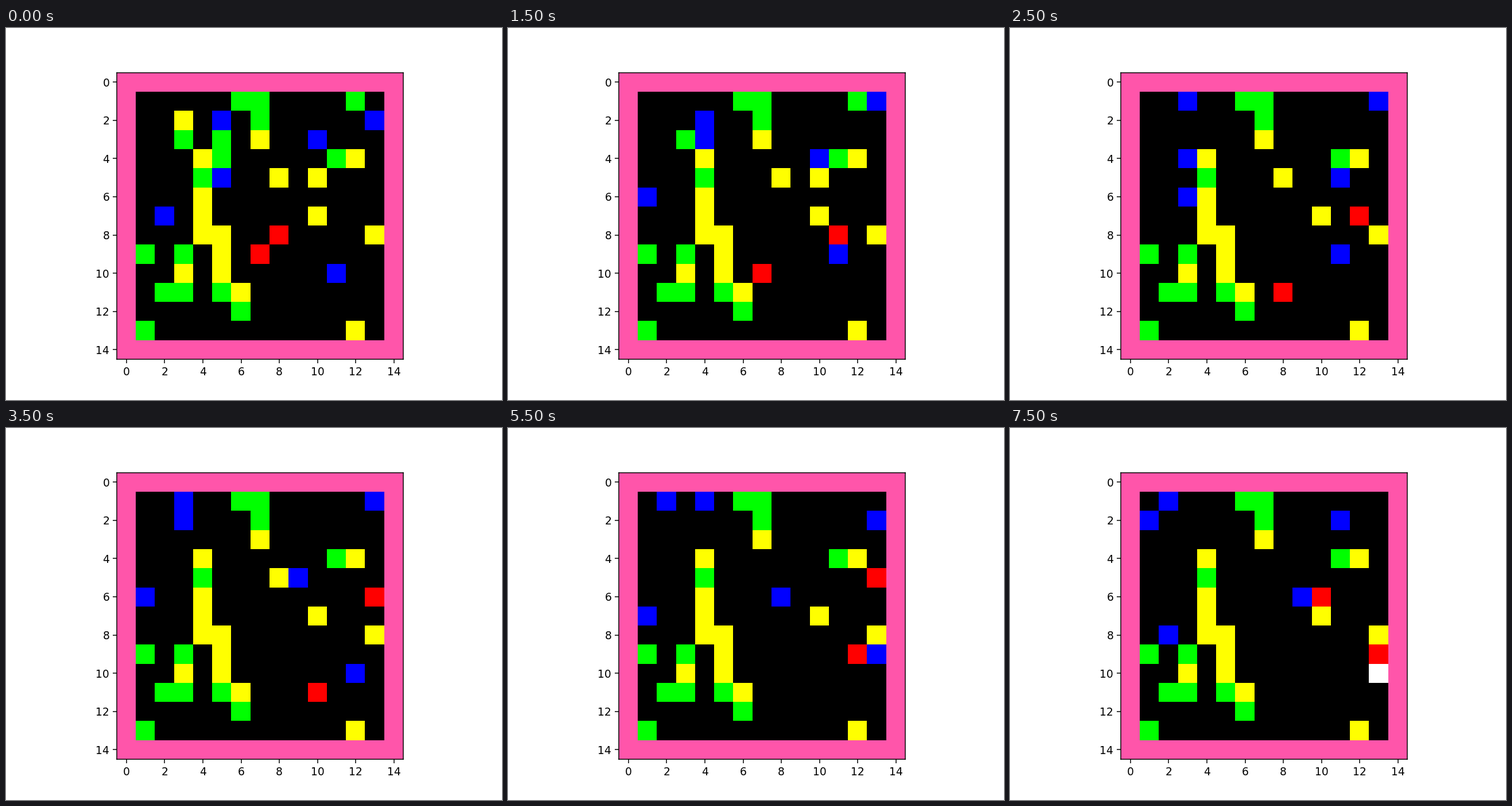
These frames come from a looping animation (864 px wide and 648 px high, 8000 ms). A matplotlib script:

```python
import numpy as np
import matplotlib.pyplot as plt
from matplotlib.animation import FuncAnimation

SIZE, STEPS, INTERVAL = 15, 16, 500

PINK = (255, 85, 170)
GREEN = (0, 255, 0)
YELLOW = (255, 255, 0)
BLUE = (0, 0, 255)
RED = (255, 0, 0)
WHITE = (255, 255, 255)

MOVES = {"U": (-1, 0), "D": (1, 0), "L": (0, -1), "R": (0, 1), ".": (0, 0)}

# Cells are (row, column)
PLANTS = [(1, 6), (1, 7), (1, 12), (2, 7), (3, 3), (3, 5), (4, 5), (4, 11),
          (5, 4), (9, 1), (9, 3), (11, 2), (11, 3), (11, 5), (12, 6), (13, 1)]
FRUIT = [(2, 3), (3, 7), (4, 4), (4, 12), (5, 8), (5, 10), (6, 4), (7, 4),
         (7, 10), (8, 4), (8, 5), (8, 13), (9, 5), (10, 3), (10, 5), (11, 6),
         (13, 12)]

# Start cell and one move per step
PREY = [((2, 5), "LLRLU..LDU..L.D"),
        ((5, 5), "UULLDUUURRLLL.."),
        ((2, 13), "U..LR.....DULLD"),
        ((3, 10), "DUDDRLLUDLDDUR."),
        ((7, 2), "L.URRLLD...D..R"),
        ((10, 11), "ULRRLDRUR..D...")]
HUNTERS = [((8, 8), "RRRURUR..U.LLDL"),
           ((9, 7), "DRLRDRRRURUD.UR")]
CAUGHT, CAUGHT_AT = 5, 13


def walk(start, moves):
    path = [start]
    for m in moves:
        (r, c), (dr, dc) = path[-1], MOVES[m]
        path.append((r + dr, c + dc))
    return path


prey_paths = [walk(*p) for p in PREY]
hunter_paths = [walk(*h) for h in HUNTERS]


def world(step):
    grid = np.zeros((SIZE, SIZE, 3), np.uint8)
    grid[[0, -1]] = PINK
    grid[:, [0, -1]] = PINK

    eaten = {cell for path in prey_paths for cell in path[:step + 1]}
    for cells, color in ((PLANTS, GREEN), (FRUIT, YELLOW)):
        for cell in cells:
            if cell not in eaten:
                grid[cell] = color

    for i, path in enumerate(prey_paths):
        dead = i == CAUGHT and step >= CAUGHT_AT
        grid[path[step]] = WHITE if dead else BLUE
    for path in hunter_paths:
        grid[path[step]] = RED
    return grid


fig, ax = plt.subplots(figsize=(6.4, 4.8), dpi=135)
image = ax.imshow(world(0), interpolation="nearest")


def update(step):
    image.set_data(world(step))
    return [image]


anim = FuncAnimation(fig, update, frames=STEPS, interval=INTERVAL,
                     repeat=True, repeat_delay=0)
plt.show()
```
